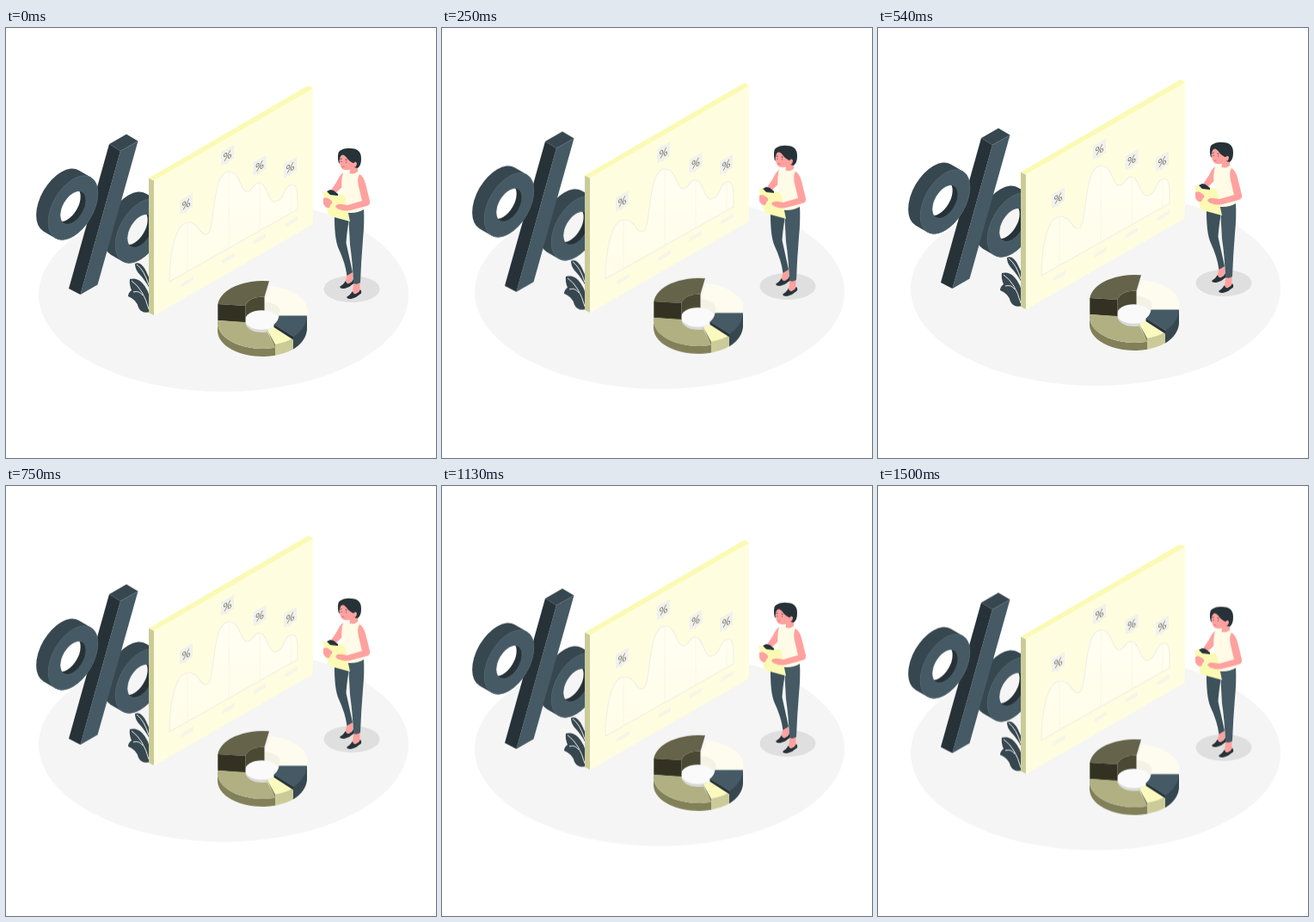
An HTML page for the animation above (1540 ms loop, 500 by 500 pixels).

```html
<!DOCTYPE html>
<html lang="en">
<head>
<meta charset="utf-8">
<title>Percent board</title>
<style>
  html, body { margin: 0; width: 100%; height: 100%; overflow: hidden; background: #fff; }
  svg { display: block; width: 100vw; height: 100vh; }
  .float { animation: float 770ms linear -40ms infinite alternate; }
  @keyframes float {
    from { transform: translateY(.5px); }
    to { transform: translateY(-9.5px); }
  }
  .tag text { font: 400 12.5px Lato, "Open Sans", sans-serif; text-anchor: middle; fill: #706f5c; }
</style>
</head>
<body>
<svg viewBox="0 0 500 500">
  <defs>
    <clipPath id="back"><circle cx="-8" cy="-8" r="18"/></clipPath>
    <mask id="hole" maskUnits="userSpaceOnUse" x="-60" y="-60" width="120" height="120">
      <path fill="#fff" d="M-60-60H60V60H-60z"/>
      <circle r="17.3" clip-path="url(#back)"/>
    </mask>
    <!-- extruded ring on the isometric wall -->
    <g id="ring" transform="matrix(.866 -.5 0 1 0 0)">
      <g mask="url(#hole)">
        <path d="M0 0l-16-16" stroke="#37474f" stroke-width="67" stroke-linecap="round"/>
        <circle r="18.5" fill="#263238"/>
      </g>
      <circle r="25.4" fill="none" stroke="#455a64" stroke-width="16.2"/>
      <circle r="33.3" fill="none" stroke="#66777f" stroke-width=".4"/>
      <circle r="17.3" fill="none" stroke="#66777f" stroke-width=".4"/>
    </g>
    <g id="tag" class="tag" transform="skewY(-30)">
      <path fill="#f1f1ed" d="M-7.500-8.500h15v16H2L-1 10-3 7.500h-4.500z"/>
      <text y="4.400">%</text>
    </g>
    <path id="plate" fill="#f5f5e9" d="M-7.500 2.200L7-6.100v4.600L-7.500 6.800z"/>
    <linearGradient id="fade" x2="0" y2="1">
      <stop offset="0" stop-color="#fffffa" stop-opacity=".7"/>
      <stop offset="1" stop-color="#fffffa" stop-opacity=".35"/>
    </linearGradient>
  </defs>

  <g class="float">
    <ellipse cx="253" cy="310" rx="215" ry="113" fill="#f5f5f5"/>

    <!-- percent sign -->
    <use href="#ring" x="156" y="236"/>
    <path fill="#37474f" d="M120 135l20-11.500 13.500 8L133 143z"/>
    <path fill="#455a64" d="M133 143l20.500-11.500-47 167-20 11.500z"/>
    <path fill="#263238" d="M120 135l13 8-46.500 167-13.500-7z"/>
    <use href="#ring" x="78" y="209"/>

    <!-- plant -->
    <g fill="#37474f">
      <path d="M150 274Q157 271 163 283L167 292V303Q161 292 154 285 150 280 150 274z"/>
      <path d="M144 292Q152 290 158 296 166 304 168 318V330Q158 333 154 325 152 316 142 312 142 308 146 305 143 298 144 292z"/>
    </g>
    <path fill="none" stroke="#fff" stroke-width=".9" d="M152 275q9 7 14 24M146 294q14 10 20 33M148 307q7-2 11 4"/>

    <!-- board -->
    <path fill="#cbcb99" d="M166 174.500l6 3V334l-5-2.500q-1-.5-1-2z"/>
    <path fill="#fafab4" d="M166 174.500L349.500 68q2-1 3.500-.2l3 1.800 1 2L172 177.500z"/>
    <path fill="#fffde0" d="M172 177.500L355 71.500q2-.8 2 1.500V226q0 2-1.500 3L172 334.500z"/>
    <path fill="url(#fade)" stroke="#f0f0e2" stroke-width="1.100" d="M190 295C190 270 195 225 213 226 225 227 225 241 233 240 244 239 238 168 259 167 273 167 272 191 281 190 288 189 288 179 295 180 304 181 304 202 313 202 324 201 323 182 333 182 340 182 339 198 339 211z"/>
    <path fill="none" stroke="#f6f6e6" stroke-width=".8" d="M211 227v56M259 168v87M295 181v54M331 183v32"/>
    <use href="#plate" x="211" y="295"/>
    <use href="#plate" x="259" y="267.500"/>
    <use href="#plate" x="295" y="245"/>
    <use href="#plate" x="332" y="225"/>
    <use href="#tag" x="209.500" y="205"/>
    <use href="#tag" x="257.500" y="148.500"/>
    <use href="#tag" x="295" y="160.500"/>
    <use href="#tag" x="330.500" y="162.500"/>

    <!-- donut -->
    <path fill="#f3f2e4" d="M300 318A19.500 11.300 0 0 1 317.500 332V342H300z"/>
    <path fill="#4a4933" d="M278.500 323A19.500 11.300 0 0 1 300.500 312.800V342h-22z"/>
    <ellipse cx="297.500" cy="343" rx="19.500" ry="11.300" fill="#d9d9d8"/>
    <ellipse cx="297.500" cy="339.500" rx="19.500" ry="11.300" fill="#fafafa"/>
    <path fill="#fdfcee" d="M307 299.700A52 30 0 0 1 350 334L317.500 333.500A19.500 11.300 0 0 0 301 318.300z"/>
    <path fill="#65644a" d="M246.300 321A52 30 0 0 1 306 294.400L300.500 312.800A19.500 11.300 0 0 0 278.500 323z"/>
    <path fill="#333222" d="M246.300 321l32.200 2v19.500l-32.200-2.500z"/>
    <path fill="#818059" d="M246 342A52 30 0 0 0 313 371.700V380.700A52 30 0 0 1 246 352z"/>
    <path fill="#b1b083" d="M246.200 340L278.500 342A19.500 11.300 0 0 0 304 353.500L313 371.700A52 30 0 0 1 246.200 340z"/>
    <path fill="#cbcb99" d="M313 367.500L334 360V373.600Q325 378.500 313 380.700z"/>
    <path fill="#818059" d="M303.500 350.500L313 367V372z"/>
    <path fill="#fafabf" d="M304 350.800Q309 349.500 312 347L334 360.500Q325 366 313 367.700z"/>
    <path fill="#37474f" d="M350 335V350.500Q349 364 334 373.600V359z"/>
    <path fill="#263238" d="M311.500 344.500L334 358.500V362.500L311.500 348z"/>
    <path fill="#455a64" d="M317.500 334.500H350Q349 349 334.500 359L311.500 345Q317 340 317.500 334.500z"/>

    <!-- woman -->
    <ellipse cx="402" cy="303.500" rx="32.500" ry="15.500" fill="#dfdfdf"/>
    <g fill="#ffa19f">
      <path d="M397 284h6v9l-4 5-5 1z"/>
      <path d="M404.500 296h7v9l-5 5-4 1z"/>
    </g>
    <g fill="#263238">
      <path id="shoe" d="M388 301q4-2 7-7 1 4 4 3 4-2 5-5 3 4-1 6-3 3-8 4.500-6 1.500-7-1.500z"/>
      <use href="#shoe" x="8" y="12"/>
    </g>
    <path fill="#3d515b" d="M382 215l17-2-1 15q-2 13-2.500 22l7.500 34-6.500 4q-2-15-10-32-5-12-4.500-41z"/>
    <path fill="#455a64" d="M398 215l18-5q1 16-1 36-2 24-3 50-4 3-8 1-1-25-4-45z"/>
    <path fill="#ffa19f" d="M392 168q-4 3-7 10l-8 12 4 4 11-10z"/>
    <path fill="#ffa19f" d="M400 158l9-1v14l-7 5-6-5q4-2 4-6z"/>
    <path fill="#fffbe6" d="M392 168q3 1 6-1 4 5 11 0 4 1 4 9l3 35q-10 6-24 3-2-12-1-22-2-14 1-24z"/>
    <path fill="#fafab4" d="M368 190l24 4q3 2 4 12l4 19-22-6q-3-1-4-5z"/>
    <path fill="#263238" d="M373 190l4-2 4 1 5 4v2l-9-1z"/>
    <path fill="#ffa19f" d="M369 198q4-2 7 1 4 2 3 5-2 1-3 5-5 1-7-5z"/>
    <path fill="#ffa19f" d="M411 170q5 3 7 11l5 20q1 5-4 6l-15 4q-10 3-16 0-4-1-5-4 2-3 8-2l6 1 17-5-4-17q-2-9 1-14z"/>
    <path fill="#263238" d="M391 150q-7-4-3-7 6-4 13-3 12 0 12 12 0 8-4 11l-8-2z"/>
    <path fill="#ffa19f" d="M388 147q5-3 10 3 3 5 5 7 3-3 5 0 0 5-4 5-3 4-10 3-5-1-6-8z"/>
    <path fill="#263238" d="M386 152q-1-9 6-11 13-1 16 7l-3 9q-5-1-8-5-4-6-7-4-3 3-2 10-2-2-2-6z"/>
    <path fill="none" stroke="#263238" stroke-width=".8" d="M388.500 152.500l2-.5M394.500 153l2 .5M390 155v1M395.500 155.500v1"/>
    <path fill="none" stroke="#d9605f" stroke-width=".8" d="M390.500 161l3 .3"/>
  </g>
</svg>
</body>
</html>
```
